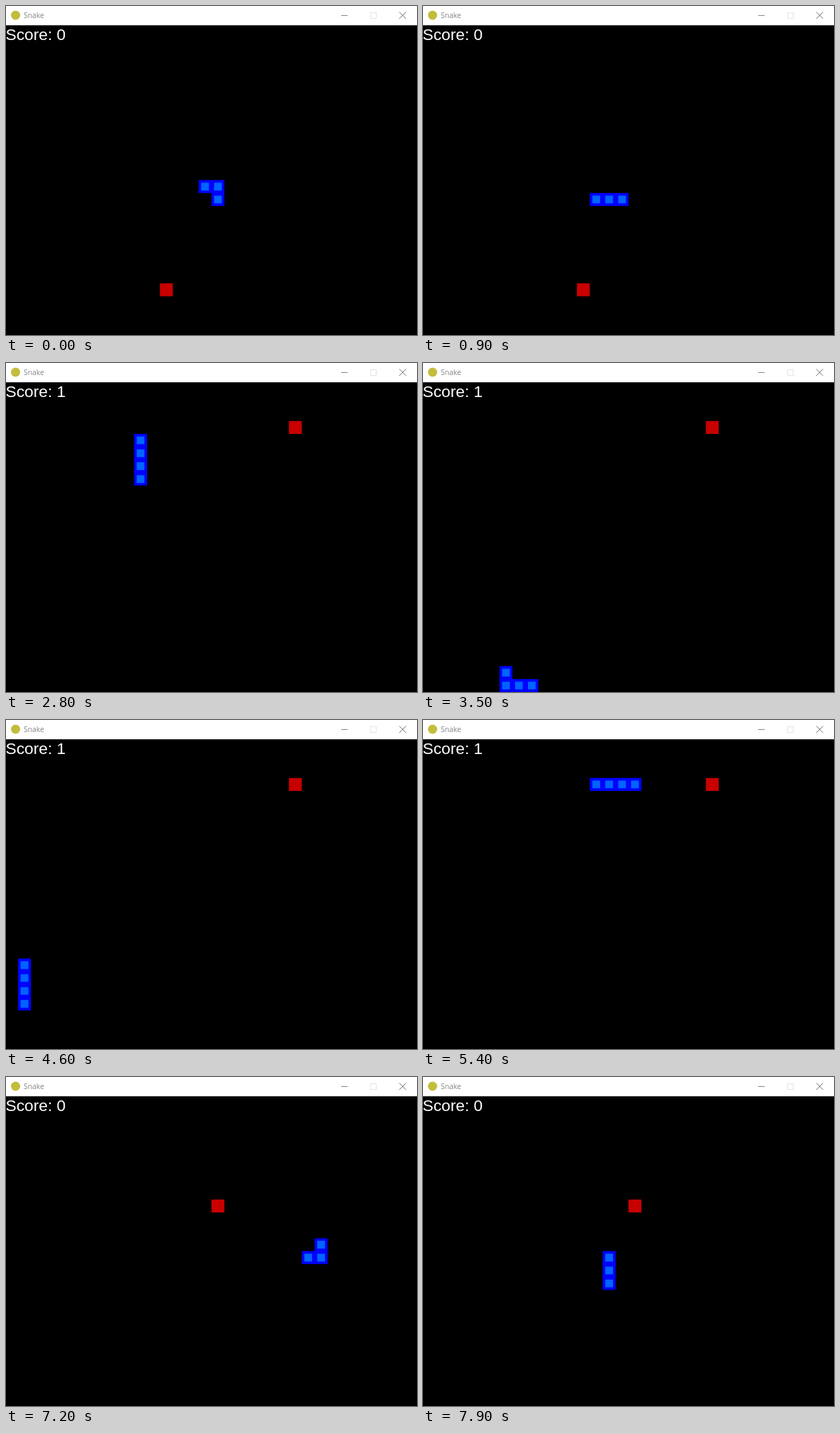
An HTML page with a canvas for the animation above (8 s loop, 580x464 px).

```html
<!DOCTYPE html>
<html lang="en">
<head>
<meta charset="utf-8">
<title>Snake</title>
<style>
  html, body { margin: 0; width: 100%; height: 100%; overflow: hidden; background: #000; }
  canvas { position: absolute; left: 0; top: 0; }
  .label { position: absolute; white-space: pre; }
  #title { left: 25px; top: 8px; font: 10.4px/11px "Open Sans", "Noto Sans", sans-serif; color: #858585; }
  #score { left: -0.5px; top: 26.5px; font: 22.75px/26px "Liberation Sans", Arial, sans-serif; color: #fff; }
</style>
</head>
<body>
<canvas id="stage" width="580" height="464"></canvas>
<div id="title" class="label">Snake</div>
<div id="score" class="label">Score: 0</div>
<script>
const ctx = document.getElementById("stage").getContext("2d");
const scoreEl = document.getElementById("score");

const LOOP = 8000, TICK = 100, RESTART = 69;
const CELL = 18.2, LEFT = -1.2, TOP = 27.2;
const MOVES = { U: [0, -1], D: [0, 1], L: [-1, 0], R: [1, 0] };

// Expands a route such as "D6L2" into the list of visited cells.
function walk(x, y, route) {
  const cells = [[x, y]];
  for (const [, dir, count] of route.matchAll(/([UDLR])(\d*)/g)) {
    for (let i = 0; i < (+count || 1); i++) {
      x += MOVES[dir][0];
      y += MOVES[dir][1];
      cells.push([x, y]);
    }
  }
  return cells;
}

// keys: [tick, steps taken]; foods: [step at which it appears, column, row]
const games = [
  {
    path: walk(16, 13, "UL" + "DRUL".repeat(5) + "LDDRULL" + "DRUL".repeat(7) + "D" +
      "D6L2U17LD20L4U10L2D10L3U9LU11R30U3L4"),
    keys: [[0, 0], [9, 27], [17, 49], [18, 53], [19, 56], [28, 86],
      [35, 107], [46, 137], [54, 168], [61, 189]],
    foods: [[0, 12, 20], [63, 22, 3], [174, 1, 18]]
  },
  {
    path: walk(14, 12, "R2" + "R8U5L10D7"),
    keys: [[RESTART, 0], [79, 30]],
    foods: [[0, 16, 8]]
  }
];

function stepsAt(keys, tick) {
  for (let i = 1; i < keys.length; i++) {
    const [t0, s0] = keys[i - 1], [t1, s1] = keys[i];
    if (tick <= t1) return Math.round(s0 + (s1 - s0) * (tick - t0) / (t1 - t0));
  }
  return keys[keys.length - 1][1];
}

// Fills all cells as one path, so that neighbours join without seams.
function fillCells(cells, color, inset = 0) {
  const size = CELL * (1 - 2 * inset);
  ctx.fillStyle = color;
  ctx.beginPath();
  for (const [col, row] of cells) {
    ctx.rect(LEFT + (col + inset) * CELL, TOP + (row + inset) * CELL, size, size);
  }
  ctx.fill();
}

function line(color, ...points) {
  ctx.strokeStyle = color;
  ctx.beginPath();
  for (let i = 0; i < points.length; i += 4) {
    ctx.moveTo(points[i], points[i + 1]);
    ctx.lineTo(points[i + 2], points[i + 3]);
  }
  ctx.stroke();
}

function drawTitleBar() {
  ctx.fillStyle = "#fff";
  ctx.fillRect(0, 0, 580, TOP);
  ctx.fillStyle = "#c3bd3c";
  ctx.beginPath();
  ctx.arc(13.5, 13, 6.5, 0, Math.PI * 2);
  ctx.fill();
  ctx.lineWidth = 1;
  line("#808080", 473, 13.4, 482, 13.4);
  line("#707070", 555, 8.5, 564.5, 18, 564.5, 8.5, 555, 18);
  ctx.strokeStyle = "#e4e4e4";
  ctx.strokeRect(514.5, 9.5, 8, 8);
}

function draw(time) {
  const tick = Math.floor((time % LOOP) / TICK);
  const game = games[tick < RESTART ? 0 : 1];
  const steps = stepsAt(game.keys, tick);
  const seen = game.foods.filter(f => f[0] <= steps);
  const score = seen.length - 1;
  const [, foodCol, foodRow] = seen[score];
  const body = game.path.slice(steps - score, steps + 3);

  ctx.fillStyle = "#000";
  ctx.fillRect(0, 0, 580, 464);
  drawTitleBar();
  fillCells(body, "#0000ff");
  fillCells(body, "#0064ff", 0.2);
  fillCells([[foodCol, foodRow]], "#c80000");

  const label = "Score: " + score;
  if (scoreEl.textContent !== label) scoreEl.textContent = label;
}

const start = performance.now();
function loop(now) {
  draw(Math.max(0, now - start));
  requestAnimationFrame(loop);
}
draw(0);
requestAnimationFrame(loop);
</script>
</body>
</html>
```
